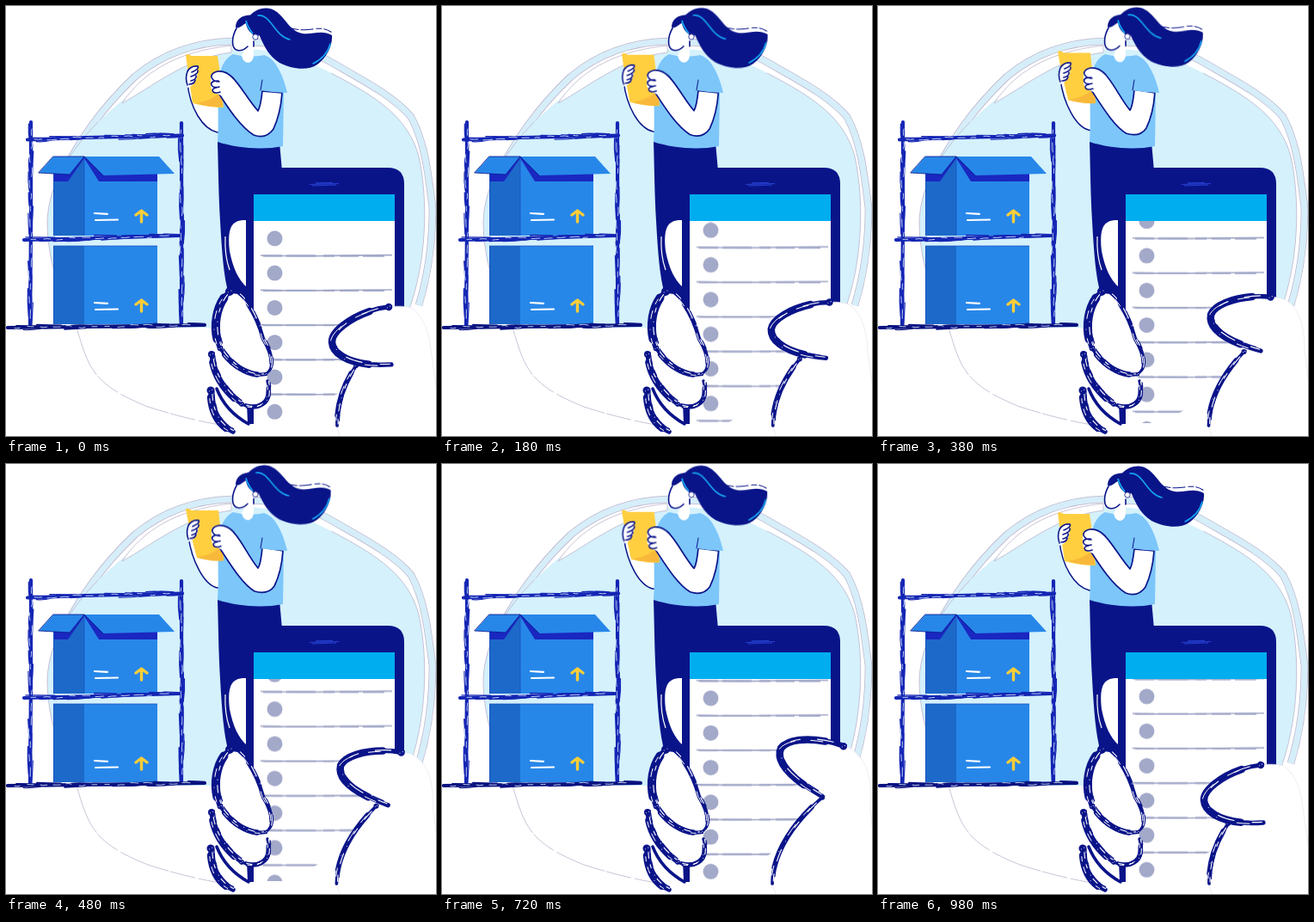
These frames come from a looping animation (500 px wide and 500 px high, 1000 ms). An HTML page:

```html
<!DOCTYPE html>
<html lang="en">
<head>
<meta charset="utf-8">
<title>Stock list</title>
<style>
html, body { margin: 0; width: 100%; height: 100%; overflow: hidden; background: #fff; }
svg { display: block; width: 100vw; height: 100vh; }
.navy { fill: #0a1489; }
.white { fill: #fff; }
.ink { fill: none; stroke: #0a1489; stroke-width: 1.6; stroke-linecap: round; stroke-linejoin: round; }
.brush { fill: none; stroke: #0a1489; stroke-linecap: round; }
.thin { fill: none; stroke: #bdb4cc; stroke-width: .8; }

.list { animation: scroll 1s linear infinite; }
@keyframes scroll { 76%, 100% { transform: translateY(-40.3px); } }

/* upper body sways up and back */
.pony, .board, .lift, .head, .armL, .armR {
  animation: .5s cubic-bezier(.37,0,.63,1) infinite alternate;
}
.pony { animation-name: swing; transform-origin: 288px 18px; }
.board { animation-name: board; }
.lift { animation-name: lift; }
.head { animation-name: nod; }
.armL { animation-name: armL; }
.armR { animation-name: armR; }
@keyframes swing { to { transform: translate(-2px, -.6px) rotate(-2deg); } }
@keyframes board {
  to { d: path("M209 52Q212 51 216 54L247 54Q249 71 253 112Q236 112 222 109Q213 77 209 52Z"); }
}
@keyframes lift { to { transform: translate(1px, -4.5px); } }
@keyframes nod { to { transform: translateY(-.7px); } }
@keyframes armL {
  to { d: path("M212 84C216 112 230 141 246 144L254 144L254 96L215 81Z"); }
}
@keyframes armR {
  to { d: path("M298 97C297 108 296 117 293 121C282 108 271 83 262 77L248 97C260 115 274 139 289 148C299 151 307 149 312 142C318 130 321 115 322 101Z"); }
}

/* thumb pushes the list up, then snaps back */
.thumb, .crease, .hand { animation: 1s linear infinite; }
.thumb { animation-name: thumb; }
.crease { animation-name: crease; }
.hand { animation-name: hand; }
@keyframes thumb {
  0%, 98%, 100% { d: path("M445 350C415 353 378 375 379 391C380 408 408 420 448 417"); }
  76% { d: path("M468 327C443 317 407 313 395 327C388 342 401 360 442 385"); }
}
@keyframes crease {
  0%, 98%, 100% { d: path("M407 418C392 440 384 465 385 488"); }
  76% { d: path("M444 386C412 413 384 451 384 488"); }
}
@keyframes hand {
  0%, 98%, 100% { d: path("M472 351Q460 348 445 350C415 353 378 375 379 391C380 408 395 417 409 418C392 440 384 465 385 490L392 510L510 510L494 400C492 380 486 362 472 351Z"); }
  76% { d: path("M484 338Q478 328 468 327C443 317 407 313 395 327C388 342 401 360 442 385C412 413 384 451 384 490L392 510L510 510L498 400C500 370 497 350 484 338Z"); }
}
</style>
</head>
<body>
<svg viewBox="0 0 500 500">
  <defs>
    <clipPath id="screen"><path d="M288 250H452V400L384 452L332 485H288Z"/></clipPath>
    <path id="ring" d="M61 208C80 160 115 115 150 82C185 53 225 42 262 41C310 42 345 47 374 63C412 85 450 104 471 129C487 158 491 195 496 235C496 280 490 315 480 348"/>
  </defs>

  <!-- backdrop -->
  <path class="thin" stroke-dasharray="60 2 30 4" d="M82 374C96 420 100 440 165 466C205 479 240 486 262 489"/>
  <use href="#ring" fill="none" stroke="#bdb4cc" stroke-width="8.6"/>
  <use href="#ring" fill="none" stroke="#d6eef9" stroke-width="7.2"/>
  <path fill="#d4f1fc" d="M48 250C50 205 75 168 107 135C145 100 185 66 245 52C300 44 345 60 378 78C432 106 468 130 480 175C491 225 490 300 466 360V374H82C62 335 48 295 48 250Z"/>
  <path class="thin" d="M82 374C62 335 48 295 48 250C50 205 75 168 107 135M378 78C432 106 468 130 480 175C491 225 490 300 466 360"/>
  <path class="white" stroke="#bdb4cc" stroke-width=".8" d="M135 113C158 79 195 53 262 46V54C210 60 170 94 135 113Z"/>

  <!-- boxes -->
  <g>
    <path fill="#1a27c0" d="M55 175H176V204H55Z"/>
    <path fill="#2787e9" d="M91 177L108 204H176V267H91Z"/>
    <path fill="#1d69c9" d="M91 177L72 204H55V267H91Z"/>
    <path fill="#2787e9" d="M55 175H91L74 196L38 194ZM91 175H178L196 195L113 197Z"/>
    <path class="ink" style="stroke-width:.8" d="M55 175H91L74 196L38 194ZM91 175L113 197"/>
    <path stroke="#1a4fc0" stroke-width=".8" d="M91 176V267M55.500 196V267"/>
    <path fill="#2787e9" d="M91 279H176V370H91Z"/>
    <path fill="#1d69c9" d="M55 279H91V370H55Z"/>
    <path stroke="#1a4fc0" stroke-width=".8" d="M55.500 279V370M55 279H176"/>
  </g>
  <g id="marks"></g>
  <g id="shelf"></g>

  <!-- woman -->
  <path class="navy" d="M246 158H318L321 192L300 230L288 372L270 338L259 335C253 315 251 285 249 250C247 215 247 190 246 158Z"/>
  <path class="white" d="M280 249C262 248 257 258 260 285C264 305 270 318 280 327Z"/>
  <path fill="none" stroke="#fff" stroke-width="1.2" d="M255 268Q254 290 260 307"/>
  <path class="armL white" stroke="#0a1489" stroke-width="1.5" d="M211 90C214 118 228 143 246 147L254 147L254 100L214 85Z"/>
  <path fill="#7cc6fa" d="M264 56C280 60 290 59 300 57C314 62 320 75 323 100L322 163C297 168 268 165 246 158C248 130 245 100 248 80C251 68 256 60 264 56Z"/>
  <path class="board" fill="#ffcf40" d="M209 57Q212 55 216 58L246 58Q249 75 253 118Q235 118 217 113Q212 80 209 57Z"/>
  <path class="lift" fill="#f8b93b" d="M252 117Q235 118 221 113Q240 110 251 99Z"/>
  <path class="armR white" stroke="#0a1489" stroke-width="1.7" stroke-linejoin="round" d="M298 99C297 108 296 117 293 122C282 110 270 88 262 82L247 101C258 118 272 140 288 150C298 154 306 150 311 143C317 130 320 115 321 101Z"/>
  <path fill="#7cc6fa" d="M295 60C311 60 320 72 327 101Q312 101 296 98Z"/>
  <path class="ink" style="stroke-width:1" d="M298 86L296 98"/>
  <g class="lift">
    <path class="white" d="M238 83Q238 76 247 76Q257 76 264 84L250 104Q239 100 238 94Z"/>
    <path class="ink" d="M264 84Q256 75 246 76Q238 78 239 83Q241 88 248 88M247 87Q237 87 239 92Q241 96 248 94M245 95Q238 96 241 100Q244 102 249 100"/>
    <path class="white" d="M224 70Q213 68 210 80Q208 89 211 95Q217 93 219 89Q224 82 222 74Z"/>
    <path class="ink" d="M211 92Q208 84 211 76Q215 69 223 70Q225 73 216 77M223 75Q224 79 215 82M221 81Q222 85 215 87M220 86Q219 91 213 91"/>
  </g>
  <g class="head">
    <path class="white" d="M277 18L268 25C264 32 263 41 264 46C266 53 271 54 277 52L274 58Q276 66 282 66Q288 64 288 57V44L292 30Z"/>
    <path class="ink" d="M268 26C264 33 263 41 264 46C266 53 274 54 281 47M288 41V47"/>
    <path class="navy" d="M267 25C267 14 277 9 290 11L297 30C295 36 289 37 287 33C283 30 280 26 279 20C275 22 271 27 267 25Z"/>
    <path fill="none" stroke="#12a4f2" stroke-width="1.8" d="M279 17Q281 25 287 32"/>
    <circle cx="290" cy="36" r="3.200" fill="#fff" stroke="#0a1489" stroke-width=".8"/>
  </g>
  <g class="pony">
    <path class="navy" d="M282 13C289 4 300 0 310 4C325 11 328 29 345 32C355 34 367 27 379 34C380 46 373 60 362 68C350 76 332 73 318 66C305 58 300 46 295 35Z"/>
    <path class="ink" style="stroke-width:1.1" stroke-dasharray="9 3 14 4 6 3" d="M331 26Q345 29 356 27Q372 24 380 32"/>
    <path fill="none" stroke="#12a4f2" stroke-width="1.6" stroke-linecap="round" d="M293 11C308 9 312 35 330 39M357 67Q373 59 377 44"/>
  </g>

  <!-- phone -->
  <path class="white" d="M288 219H452V420H288Z"/>
  <path class="navy" d="M279 207Q279 188 298 188H444Q463 188 463 207V372H452V219H288V372L279 332Z"/>
  <path fill="none" stroke="#2540cf" stroke-width="1.200" d="M353 207.500L387 206.500M356 209L384 208M360 205.800L380 205.500"/>
  <g clip-path="url(#screen)"><g class="list" id="list"></g></g>
  <path fill="#00aef0" d="M288 219H452V250H288Z"/>

  <!-- fingers -->
  <path class="white" d="M236 442C235 470 245 490 268 498L286 486V465L240 402Z"/>
  <path class="navy" d="M280 461H288V486H281Z"/>
  <path class="brush" stroke-width="9" d="M238 447C238 472 247 488 264 495"/>
  <path class="brush" stroke-width="3.500" d="M245 445C252 463 264 476 282 486"/>
  <path class="white" d="M240 403C242 432 256 452 275 465C290 469 303 463 305 450Q306 440 303 432L260 410Z"/>
  <path class="brush" stroke-width="8" d="M239 405C240 426 252 447 274 463"/>
  <path class="brush" stroke-width="5.500" d="M274 463C291 471 304 462 305 452Q306 443 304 436"/>
  <path class="white" d="M262 334C242 347 239 378 249 399C262 420 285 432 304 428C313 421 309 403 299 387C294 368 282 343 270 335Z"/>
  <path class="brush" stroke-width="10" d="M260 332C244 346 239 376 249 398"/>
  <path class="brush" stroke-width="6.500" d="M249 398C262 419 285 432 302 428"/>
  <path class="brush" stroke-width="4.500" d="M302 428C313 421 309 403 299 387C294 368 282 343 270 334"/>

  <!-- thumb -->
  <path class="hand white" stroke="#ebe8f1" stroke-width=".8" d="M472 351Q460 348 445 350C415 353 378 375 379 391C380 408 395 417 409 418C392 440 384 465 385 490L392 510L510 510L494 400C492 380 486 362 472 351Z"/>
  <path class="brush crease" stroke-width="6" d="M407 418C392 440 384 465 385 488"/>
  <path class="brush thumb" stroke-width="8.500" d="M445 350C415 353 378 375 379 391C380 408 408 420 448 417"/>
</svg>
<script>
const $ = id => document.getElementById(id);
let seed = 7;
const rnd = (a, b) => {
  seed = (seed * 16807) % 2147483647;
  return a + (b - a) * seed / 2147483647;
};

function add(parent, tag, attrs) {
  const el = document.createElementNS('http://www.w3.org/2000/svg', tag);
  for (const k in attrs) el.setAttribute(k, attrs[k]);
  parent.appendChild(el);
  return el;
}

// Rough straight bar built from overlapping strands
function bar(x1, y1, x2, y2, w, color) {
  const len = Math.hypot(x2 - x1, y2 - y1);
  const ux = (x2 - x1) / len, uy = (y2 - y1) / len;
  const strand = (off, from, to, width, stroke) => {
    const at = (s, o) => `${x1 + ux * s - uy * o} ${y1 + uy * s + ux * o}`;
    const mid = at((from + to) / 2, off + rnd(-1, 1));
    add($('shelf'), 'path', {
      d: `M${at(from, off)}Q${mid} ${at(to, off * .6)}`,
      fill: 'none', stroke, 'stroke-width': width, 'stroke-linecap': 'round'
    });
  };
  strand(0, 0, len, w * .6, color);
  for (let s = 2; s < len - 16; s += 8) {
    strand(rnd(-w, w) * .45, s, Math.min(len, s + rnd(14, 34)), rnd(1, 2), color);
  }
  for (let s = 8; s < len - 14; s += 15) {
    strand(rnd(-w, w) * .25, s, s + rnd(5, 11), .8, '#e4f4ff');
  }
}

const BLUE = '#1526b4', DARK = '#0a1280';
bar(29, 135, 28, 371, 7, BLUE);
bar(204, 136, 204, 371, 7, BLUE);
bar(25, 155.5, 205, 150.5, 7, BLUE);
bar(21, 272, 201, 267, 7, BLUE);
bar(2, 374, 231, 371, 7, DARK);

for (const y of [241, 345]) {
  add($('marks'), 'path', {
    d: `M103 ${y}L118 ${y + .8}M104 ${y + 8}L130 ${y + 7.5}`,
    stroke: '#fff', 'stroke-width': 2.2, 'stroke-linecap': 'round'
  });
  add($('marks'), 'path', {
    d: `M157.5 ${y + 10}V${y - 2}M151 ${y + 2}L157.5 ${y - 3}L164 ${y + 2}`,
    fill: 'none', stroke: '#ffce38', 'stroke-width': 3.4,
    'stroke-linecap': 'round', 'stroke-linejoin': 'round'
  });
}

const GREY = '#a3a9c9';
for (let i = 0; i < 7; i++) {
  const y = 290 + 40.3 * i;
  add($('list'), 'circle', { cx: 312.5, cy: 270.3 + 40.3 * i, r: 9, fill: GREY });
  add($('list'), 'path', {
    d: `M296 ${y}Q340 ${y + 1} 380 ${y + .3}T449 ${y - .3}`,
    fill: 'none', stroke: GREY, 'stroke-width': 1.7
  });
  add($('list'), 'path', {
    d: `M299 ${y + .5}H440`, fill: 'none', stroke: GREY,
    'stroke-width': 2.3, 'stroke-dasharray': '22 5 34 9 13 6'
  });
}

// Tapered ends, dry streaks and ragged edges for the bold outlines
document.querySelectorAll('.brush').forEach(p => {
  const w = +p.getAttribute('stroke-width');
  if (w < 4) return;
  const streak = (off, color, width, dash) => {
    const c = p.cloneNode();
    c.setAttribute('pathLength', 100);
    c.setAttribute('transform', `translate(${off} ${-off * .5})`);
    c.style.stroke = color;
    c.style.strokeWidth = width;
    c.style.strokeDasharray = dash;
    p.after(c);
  };
  streak(w * .2, '#fff', 1.1, '0 9 12 13 7 16');
  streak(-w * .18, '#fff', 1, '0 15 9 12 13 18');
  streak(w * .42, '#0a1489', 1.4, '0 4 15 11 9 16');
  streak(0, '#0a1489', w, '0 14 70 100');
  p.style.strokeWidth = w * .62;
});
</script>
</body>
</html>
```
